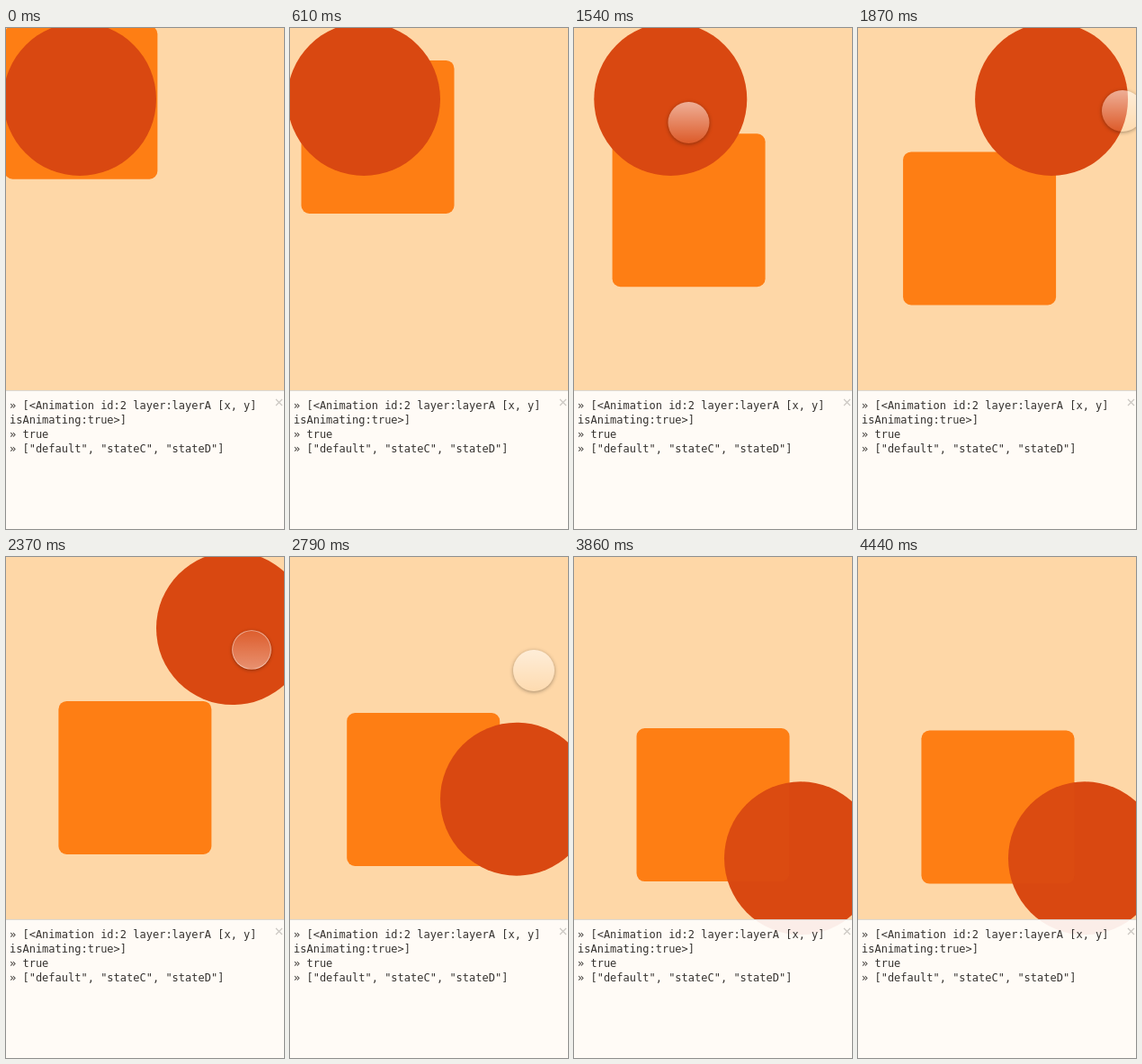
An HTML page that plays this animation: 309 by 556 pixels, repeating every 4650 ms.

```html
<!DOCTYPE html>
<html lang="en">
<head>
<meta charset="utf-8">
<title>Layer states</title>
<style>
  html, body { margin: 0; width: 100%; height: 100%; overflow: hidden; background: #fed7a7; }
  #stage { position: relative; width: 309px; height: 556px; overflow: hidden; background: #fed7a7; }
  #stage > * { position: absolute; left: 0; top: 0; box-sizing: border-box; }
  .square, .disc { width: 170px; height: 170px; }
  .square { border-radius: 9px; background: #fe7e14; }
  .disc { border-radius: 50%; background: #d94811; }
  #tint { opacity: .06; }
  #touch {
    width: 46px; height: 46px; border-radius: 50%;
    background: linear-gradient(rgba(255,255,255,.56), rgba(255,255,255,.1));
    box-shadow: 0 1px 4px rgba(0,0,0,.36);
  }
  #touch.down {
    background: linear-gradient(rgba(255,255,255,.12), rgba(255,255,255,.4));
    border: 1px solid rgba(255,255,255,.45);
  }
  #stage > #console {
    top: 402px; width: 309px; height: 154px; padding: 8px 0 0 4px; margin: 0;
    border-top: 1px solid rgba(0,0,0,.14);
    background: rgba(255,255,255,.9);
    font: 12px/16px "DejaVu Sans Mono", monospace; color: #35322f; white-space: pre;
  }
  #close { position: absolute; left: 299px; top: 8px; width: 9px; height: 9px; stroke: #cbc7c2; stroke-width: 1.2; }
</style>
</head>
<body>
<div id="stage">
  <div id="square" class="square"></div>
  <div id="disc" class="disc"></div>
  <div id="tint" class="square"></div>
  <div id="touch"></div>
  <pre id="console">» [&lt;Animation id:2 layer:layerA [x, y]
isAnimating:true&gt;]
» true
» ["default", "stateC", "stateD"]<svg id="close" viewBox="0 0 9 9"><path d="M1 1L8 8M8 1L1 8"/></svg></pre>
</div>
<script>
const LOOP = 4650, END = 4440;
const DRIFT = 4720, DRIFT_AT = -155;
const MOVE = 944, RIGHT_AT = 1417, DOWN_AT = 2370;
const HOME = { x: -3, y: -6 };

const touchStops = [
  { t: 680, x: -30, y: 165 },
  { t: 1110, x: 68, y: 123 },
  { t: RIGHT_AT, x: 90, y: 108 },
  { t: 1870, x: 294, y: 92 },
  { t: DOWN_AT, x: 273, y: 103 },
  { t: 2790, x: 271, y: 126 },
  { t: 3130, x: -30, y: 190 }
];

const $ = id => document.getElementById(id);
const square = $('square'), disc = $('disc'), tint = $('tint'), touch = $('touch');
const clamp = v => Math.min(1, Math.max(0, v));
const mix = (a, b, p) => a + (b - a) * p;

// cubic-bezier(.25, .1, .25, 1)
function ease(p) {
  let lo = 0, hi = 1;
  for (let i = 0; i < 24; i++) {
    const s = (lo + hi) / 2;
    if (.75 * s * (1 - s) + s * s * s < p) lo = s; else hi = s;
  }
  const r = 1 - lo;
  return .3 * lo * r * r + 3 * lo * lo * r + lo * lo * lo;
}

const progress = (t, from, span) => ease(clamp((t - from) / span));

function place(el, x, y, scale = 1) {
  el.style.transform = `translate(${x}px, ${y}px) scale(${scale})`;
}

function show(el, on) {
  el.style.visibility = on ? 'visible' : 'hidden';
}

function drawTouch(t) {
  const i = touchStops.findIndex(stop => stop.t > t);
  show(touch, i > 0);
  if (i < 1) return;
  const a = touchStops[i - 1], b = touchStops[i];
  const u = (t - a.t) / (b.t - a.t), p = u * u * (3 - 2 * u);
  const pressed = [RIGHT_AT, DOWN_AT].some(at => Math.abs(t - at) < 60);
  touch.className = pressed ? 'down' : '';
  place(touch, mix(a.x, b.x, p) - 23, mix(a.y, b.y, p) - 23, pressed ? .95 : 1);
}

function draw(time) {
  const t = Math.min(time % LOOP, END);

  const drift = progress(t, DRIFT_AT, DRIFT);
  const x = mix(HOME.x, 70.5, drift), y = mix(HOME.y, 192.7, drift);
  place(square, x, y);
  place(tint, x, y);
  show(tint, t >= DOWN_AT + MOVE);

  const right = progress(t, RIGHT_AT, MOVE), down = progress(t, DOWN_AT, MOVE);
  place(disc, mix(HOME.x, 167, right), mix(HOME.y, 249.3, down));

  drawTouch(t);
}

const start = performance.now();
function tick() {
  draw(performance.now() - start);
  requestAnimationFrame(tick);
}
tick();
</script>
</body>
</html>
```
